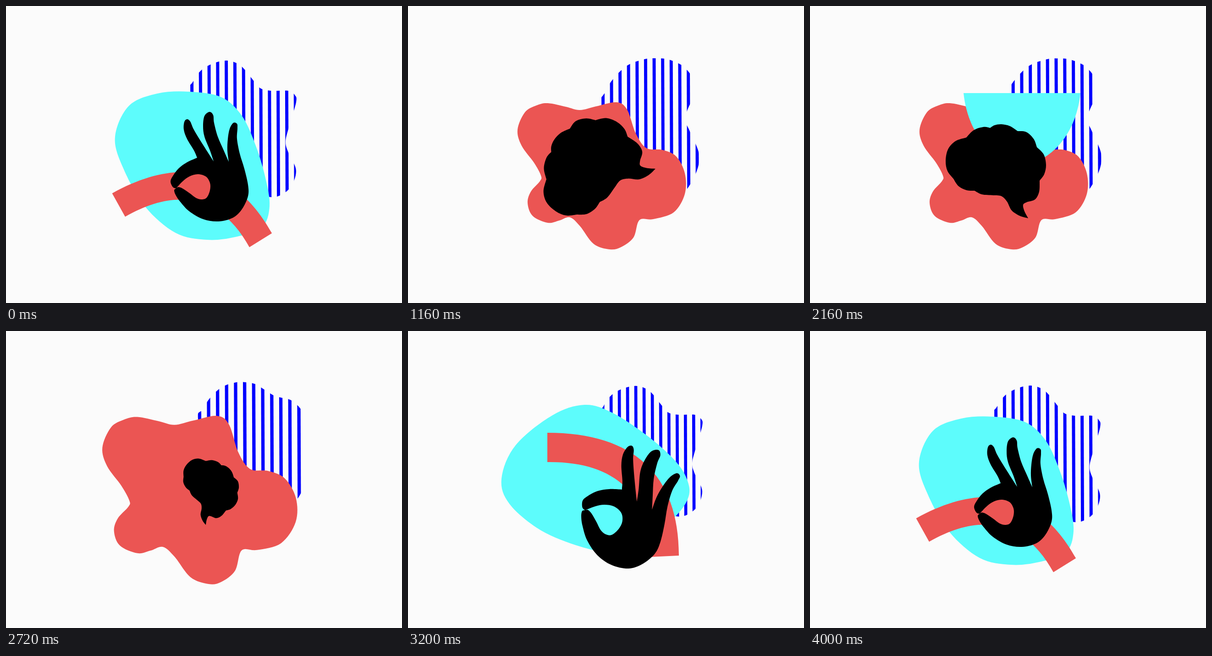
Write an HTML page with a canvas that moves like this. It is 864 px wide and 648 px high and loops after 4080 ms.

```html
<!DOCTYPE html>
<html lang="en">
<head>
<meta charset="utf-8">
<title>Shape morph loop</title>
<style>
html, body { margin: 0; width: 100%; height: 100%; overflow: hidden; background: #fbfbfb; }
canvas { display: block; }
</style>
</head>
<body>
<canvas id="stage" width="864" height="648"></canvas>
<script>
const ctx = document.getElementById('stage').getContext('2d');
const LOOP = 4080, STEP = 40;
const RED = '#eb5553', CYAN = '#5dfcfc', BLUE = '#0000ff';

// Outlines are flat lists: x, y, x, y ...
const stripesRest = [401,190, 408,165, 424,142, 450,126, 481,119, 506,126, 522,140, 541,164,
  556,180, 580,185, 616,185, 630,194, 633,210, 617,265, 610,297, 617,322, 633,360, 617,400,
  578,417, 530,390, 430,290];
const stripesGrow = [383,255, 400,213, 423,176, 455,148, 498,135, 521,134, 545,137, 568,144,
  587,155, 597,165, 607,181, 612,196, 612,210, 600,250, 595,277, 611,306, 640,375, 611,446,
  545,493, 475,504, 400,475];
const stripesTalk = [418,225, 430,188, 447,160, 478,130, 516,116, 540,114, 560,115, 578,120,
  597,129, 609,140, 617,151, 625,175, 624,195, 610,226, 604,248, 616,276, 636,331, 617,387,
  580,425, 520,430, 440,350];
const stripesBack = [405,147, 412,124, 430,97, 452,82, 477,77, 499,81, 518,90, 545,115,
  567,131, 590,130, 625,126, 658,131, 677,142, 691,165, 697,215, 685,283, 676,308, 660,333,
  640,341, 620,365, 500,330];

const cyanRest = [400,187, 470,199, 515,240, 545,305, 566,375, 575,437, 558,483, 500,504,
  438,510, 370,495, 303,437, 255,352, 238,285, 268,218, 330,191];
const cyanSmall = [283,243, 312,248, 335,262, 350,287, 356,312, 354,337, 338,350, 315,352,
  285,350, 253,345, 230,327, 220,300, 224,278, 238,259, 258,247];
const cyanTall = [382,144, 440,158, 510,206, 552,255, 563,320, 541,422, 510,484, 470,538,
  425,560, 375,542, 310,494, 268,430, 258,355, 273,265, 320,171];
const cyanWide = [385,161, 445,178, 520,227, 580,280, 608,322, 612,362, 580,408, 510,462,
  440,481, 375,470, 290,435, 222,378, 204,322, 235,249, 315,184];

const redSmall = [275,325, 305,305, 330,295, 347,281, 378,254, 400,259, 425,273, 450,287,
  475,274, 497,267, 530,278, 552,308, 555,340, 540,367, 519,386, 526,410, 525,436, 510,457,
  485,465, 455,459, 428,452, 416,464, 402,485, 377,493, 355,481, 346,458, 348,440, 338,428,
  300,415, 275,402, 262,385, 259,370, 263,347];
const redFull = [305,212, 345,220, 375,227, 410,219, 455,210, 478,226, 497,278, 520,310,
  555,314, 585,328, 604,365, 604,410, 580,450, 535,465, 505,467, 492,505, 465,526, 440,531,
  405,519, 375,480, 353,461, 330,468, 305,473, 272,458, 261,430, 268,405, 288,382, 290,370,
  275,342, 248,305, 239,270, 255,232, 280,217];
const redLow = [320,400, 345,385, 375,375, 410,365, 450,355, 490,350, 530,350, 565,352,
  605,357, 626,366, 637,385, 639,410, 646,455, 637,500, 612,534, 575,556, 540,576, 520,597,
  485,616, 447,623, 415,612, 380,590, 345,580, 310,569, 285,546, 274,512, 279,488, 290,468,
  300,450, 305,440, 308,430, 310,420, 314,410];

// Smooth runs that meet in corners
const hand = [
  [371,398, 364,395, 359,383, 364,371, 377,354, 395,341, 417,331],
  [417,331, 410,315, 395,290, 388,270, 389,253, 395,247, 402,252, 410,270, 430,303, 453,339],
  [453,339, 445,315, 433,285, 430,262, 433,240, 444,231, 452,238, 454,255, 462,285, 475,315, 486,340],
  [486,340, 483,315, 484,290, 488,268, 496,255, 504,257, 505,267, 504,290, 510,322, 520,355,
   528,390, 528,415, 515,443, 495,462, 463,470, 430,465, 400,448, 380,427, 370,412, 367,402, 371,398]
];
const handHole = [371,398, 385,383, 400,372, 418,367, 436,372, 445,386, 445,402, 438,418,
  427,422, 415,419, 400,408, 385,398, 376,395, 371,398];
const bubble = [
  [341,287, 357,271, 378,264, 393,266],
  [393,266, 403,260, 418,258, 436,262, 453,273],
  [453,273, 472,275, 488,290, 495,308],
  [495,308, 510,324, 515,347, 511,367, 501,381],
  [501,381, 500,405, 491,422, 473,428, 465,434, 468,448, 476,463],
  [476,463, 458,458, 440,446, 430,427, 418,415, 400,413, 375,411, 359,403],
  [359,403, 342,402, 324,393, 313,377],
  [313,377, 300,360, 296,338, 301,313, 317,295, 341,287]
];

// Scale an outline about (cx, cy), then shift it
function grow(pts, s, cx, cy, dx = 0, dy = 0) {
  return pts.map((v, i) => i % 2 ? cy + (v - cy) * s + dy : cx + (v - cx) * s + dx);
}
const stripes = (gap, ref, pts) => [gap, ref, ...pts];

const stripeKeys = [
  [0, stripes(18.8, 537.5, stripesRest)],
  [320, stripes(18.5, 539, grow(stripesRest, .98, 633, 300))],
  [560, stripes(21, 526, grow(stripesRest, 1.12, 633, 300))],
  [680, stripes(23.43, 521.3, stripesGrow)],
  [800, stripes(23.4, 525, grow(stripesTalk, 1.25, 636, 114, 12, -98))],
  [960, stripes(18.3, 539, grow(stripesTalk, .97, 620, 250))],
  [1160, stripes(18.63, 537.5, stripesTalk)],
  [1440, stripes(18.8, 537.5, stripesTalk)],
  [2280, stripes(18.8, 537.5, grow(stripesTalk, 1, 0, 0, .5, .5))],
  [2600, stripes(18.2, 540, grow(stripesTalk, .97, 620, 250))],
  [2840, stripes(21.8, 542, grow(stripesBack, .96, 697, 300, -3, 10))],
  [2960, stripes(22.7, 544.7, stripesBack)],
  [3200, stripes(18, 551.5, grow(stripesRest, .957, 610, 297, 10, -7))],
  [3440, stripes(18.9, 537, grow(stripesRest, 1.005, 620, 300))],
  [4000, stripes(18.8, 537.5, stripesRest)]
];
const cyanKeys = [
  [0, cyanRest],
  [300, grow(cyanRest, .98, 400, 350)],
  [520, grow(cyanRest, .96, 400, 350, -42, -12)],
  [680, cyanSmall],
  [780, grow(cyanSmall, .02, 270, 280)],
  [2740, grow(cyanTall, .05, 410, 350)],
  [2960, cyanTall],
  [3200, cyanWide],
  [3400, grow(cyanRest, 1.03, 420, 350)],
  [3700, grow(cyanRest, .99, 410, 350)],
  [4000, cyanRest]
];
const redKeys = [
  [560, grow(redSmall, .1, 410, 370)],
  [680, redSmall],
  [840, grow(redFull, 1.2, 422, 368)],
  [1000, grow(redFull, .97, 422, 368)],
  [1160, redFull],
  [2280, redFull],
  [2560, grow(redFull, .96, 422, 368)],
  [2760, grow(redFull, 1.18, 422, 368)],
  [2960, redLow],
  [3080, grow(redLow, .1, 440, 470)]
];
// Poses: x, y, degrees, scale, bend
const arcKeys = [
  [0, [395.5, 493, -29, .915]],
  [320, [395, 491, -26, .93]],
  [540, [395, 462, -40, .85]],
  [640, [395, 410, -50, .2]],
  [3040, [440, 440, 30, .4]],
  [3120, [428, 402, 14, 1.04]],
  [3200, [416, 389.5, 0, 1]],
  [3440, [393, 496, -32, .93]],
  [3720, [396, 492, -28, .91]],
  [4000, [395.5, 493, -29, .915]]
];
const semiKeys = [
  [1280, [460, 240, -30, .05]],
  [1520, [460, 190, 9, 1.06]],
  [1800, [465, 189, -4, 1.08]],
  [2160, [462.5, 190, 0, 1]],
  [2280, [462.5, 190, 0, 1]],
  [2480, [462.5, 188, 4, 1.05]],
  [2680, [440, 270, -20, .05]]
];
const handKeys = [
  [0, [371, 398, 0, 1, 0]],
  [300, [372, 398, -4, 1, -2]],
  [520, [371, 385, 5, .97, 2]],
  [680, [373, 357, 21, .78, 6]],
  [760, [390, 350, 30, .55, 6]],
  [2760, [430, 340, 48, .5, 8]],
  [2960, [452, 303, 34, 1.055, 6]],
  [3200, [386, 391, 26, 1.137, 1]],
  [3440, [368, 400, -5, 1.02, -3]],
  [3720, [371, 398, 1, 1, 1]],
  [4000, [370, 399, 0, 1, 0]],
  [4080, [371, 398, 0, 1, 0]]
];
const bubbleKeys = [
  [740, [418, 365, -100, .5]],
  [880, [421, 364, -76, 1.18]],
  [1160, [421, 366.5, -58, 1.078]],
  [1480, [404, 376, 8, 1.04]],
  [1760, [409, 375, -3, 1]],
  [2160, [408.5, 375, 0, 1]],
  [2280, [408.5, 375, 0, 1]],
  [2500, [408, 375, -8, 1.02]],
  [2660, [425, 362, 18, .9]],
  [2760, [440, 350, 45, .5]]
];

// Monotone cubic interpolation of whole vectors
function tween(keys, t) {
  const last = keys.length - 1;
  if (t <= keys[0][0]) return keys[0][1];
  if (t >= keys[last][0]) return keys[last][1];
  let k = 0;
  while (keys[k + 1][0] <= t) k++;
  const span = keys[k + 1][0] - keys[k][0], u = (t - keys[k][0]) / span;
  const slope = (j, i) => j < 0 || j >= last ? 0
    : (keys[j + 1][1][i] - keys[j][1][i]) / (keys[j + 1][0] - keys[j][0]);
  const tangent = (a, b) => a * b <= 0 ? 0 : 2 * a * b / (a + b);
  const ease = u * u * (3 - 2 * u);
  return keys[k][1].map((a, i) => {
    const s = slope(k, i);
    const m0 = tangent(slope(k - 1, i), s), m1 = tangent(s, slope(k + 1, i));
    return a + (keys[k + 1][1][i] - a) * ease
      + span * u * (1 - u) * (m0 * (1 - u) - m1 * u);
  });
}

// Catmull-Rom run through a flat outline
function trace(p, closed, join) {
  const n = p.length / 2;
  const idx = i => closed ? (i + n) % n : Math.max(0, Math.min(n - 1, i));
  const X = i => p[2 * idx(i)], Y = i => p[2 * idx(i) + 1];
  if (!join) ctx.moveTo(X(0), Y(0));
  for (let i = 0; i < (closed ? n : n - 1); i++) {
    ctx.bezierCurveTo(
      X(i) + (X(i + 1) - X(i - 1)) / 6, Y(i) + (Y(i + 1) - Y(i - 1)) / 6,
      X(i + 1) - (X(i + 2) - X(i)) / 6, Y(i + 1) - (Y(i + 2) - Y(i)) / 6,
      X(i + 1), Y(i + 1));
  }
}

function blob(pts, color) {
  ctx.beginPath();
  trace(pts, true);
  ctx.fillStyle = color;
  ctx.fill();
}

function posed(pose, px, py, draw) {
  const [x, y, deg, s] = pose;
  ctx.save();
  ctx.translate(x, y);
  ctx.rotate(deg * Math.PI / 180);
  ctx.scale(s, s);
  ctx.translate(-px, -py);
  ctx.beginPath();
  draw();
  ctx.restore();
}

function drawStripes(t) {
  const [gap, ref, ...pts] = tween(stripeKeys, t);
  const w = gap * .37;
  ctx.save();
  ctx.beginPath();
  trace(pts, true);
  ctx.clip();
  ctx.transform(1, 0, .004, 1, -1, 0);
  ctx.fillStyle = BLUE;
  for (let i = -14; i <= 14; i++) ctx.fillRect(ref + i * gap - w / 2, 0, w, 648);
  ctx.restore();
}

function drawArc(t) {
  posed(tween(arcKeys, t), 416, 389.5, () => {
    ctx.moveTo(304, 222);
    ctx.bezierCurveTo(494, 222, 591, 315, 591, 490);
    ctx.lineTo(528, 493);
    ctx.bezierCurveTo(528, 357, 452, 284, 304, 286);
    ctx.fillStyle = RED;
    ctx.fill();
  });
}

function drawSemi(t) {
  posed(tween(semiKeys, t), 0, 0, () => {
    ctx.moveTo(-127.5, 0);
    ctx.bezierCurveTo(-117, 100, -52, 155, 0, 155);
    ctx.bezierCurveTo(52, 155, 117, 100, 127.5, 0);
    ctx.fillStyle = CYAN;
    ctx.fill();
  });
}

function drawHand(t) {
  const pose = tween(handKeys, t);
  const bend = pose[4] * Math.PI / 180;
  // Fingers turn further than the palm
  const flex = run => {
    const out = [];
    for (let i = 0; i < run.length; i += 2) {
      const x = run[i] - 371, y = run[i + 1] - 398;
      const a = bend * Math.max(0, Math.min(1, (380 - run[i + 1]) / 140));
      out.push(371 + x * Math.cos(a) - y * Math.sin(a), 398 + x * Math.sin(a) + y * Math.cos(a));
    }
    return out;
  };
  posed(pose, 371, 398, () => {
    hand.forEach((run, i) => trace(flex(run), false, i > 0));
    trace(flex(handHole), false);
    ctx.fillStyle = '#000';
    ctx.fill('evenodd');
  });
}

function drawBubble(t) {
  posed(tween(bubbleKeys, t), 408.5, 375, () => {
    bubble.forEach((run, i) => trace(run, false, i > 0));
    ctx.fillStyle = '#000';
    ctx.fill();
  });
}

function frame(now) {
  const t = Math.floor(now % LOOP / STEP) * STEP;
  ctx.fillStyle = '#fbfbfb';
  ctx.fillRect(0, 0, 864, 648);
  drawStripes(t);
  if (t > 560 && t < 3080) blob(tween(redKeys, t), RED);
  if (t < 780 || t > 2740) blob(tween(cyanKeys, t), CYAN);
  if (t > 1280 && t < 2680) drawSemi(t);
  if (t < 640 || t >= 3040) drawArc(t);
  if (t < 760 || t >= 2760) drawHand(t);
  else drawBubble(t);
  requestAnimationFrame(frame);
}
requestAnimationFrame(frame);
</script>
</body>
</html>
```
